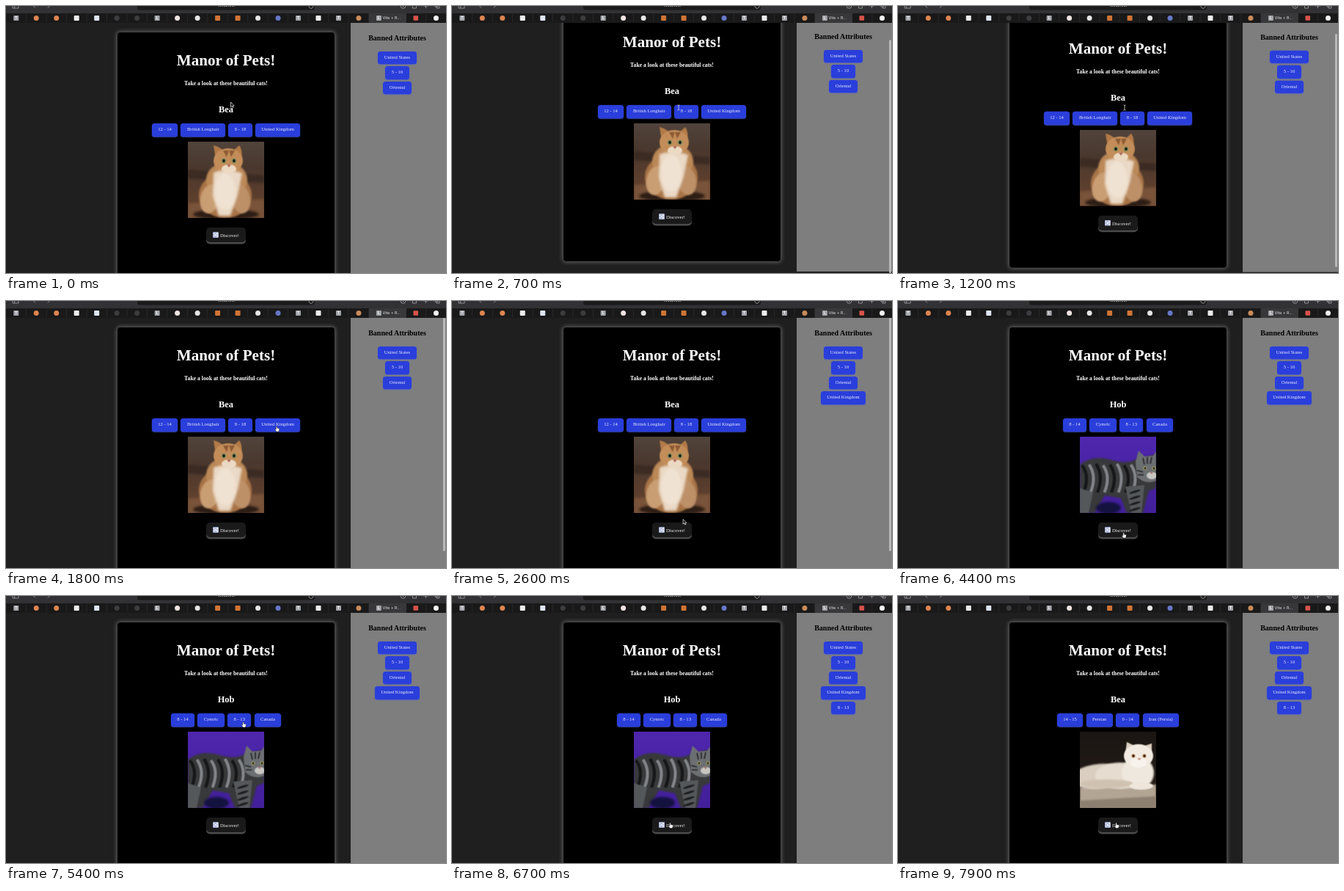
Recreate the animation shown at these times as an HTML page with a canvas. Size 600x364 px, loop 8000 ms.

```html
<!DOCTYPE html>
<html lang="en">
<head>
<meta charset="utf-8">
<title>Manor of Pets!</title>
<style>
html, body { margin: 0; width: 100%; height: 100%; overflow: hidden; background: #1f1f1f; }
#stage { position: relative; width: 600px; height: 364px; overflow: hidden; background: #1f1f1f;
  font: 6.6px 'Liberation Serif', 'Times New Roman', serif; color: #fff; }
#stage div, #stage canvas, #stage svg { position: absolute; }
#page, #side { top: 0; left: 0; width: 600px; height: 400px; }
#card { left: 152px; top: 36px; width: 296px; height: 337px; border-radius: 4px; background: #000;
  box-shadow: 0 0 5px 2px #555; }
#panel { left: 469.5px; top: 20px; width: 130.5px; height: 344px; background: #7e7e7e; }
.line { left: 152px; width: 296px; height: 24px; line-height: 24px; text-align: center;
  font-weight: bold; white-space: nowrap; }
#stage .tag { position: static; box-sizing: border-box; height: 17.3px; line-height: 16.8px; padding: 0 8.5px;
  border-radius: 3.5px; background: #2a3edb; color: #e9ebfb; white-space: nowrap;
  box-shadow: 0 .8px 1.2px #4556d6; }
#tags { left: 152px; top: 160.4px; width: 296px; display: flex; justify-content: center; gap: 4.1px; }
#bans { left: 469.5px; top: 62px; width: 128px; display: flex; flex-direction: column;
  align-items: center; gap: 3.2px; }
#discover { left: 273.3px; top: 302px; width: 53.4px; height: 20px; border-radius: 5px;
  background: #1a1a1a; box-shadow: 0 2.4px 0 #4b4b4b; }
#discover span { position: absolute; left: 18.6px; top: 0; line-height: 21.4px; color: #f2f2f2; }
#discover svg { left: 8.6px; top: 6px; }
#photo { left: 248px; top: 185px; width: 104px; height: 104px; }
#bar { left: 596px; top: 23px; width: 3px; height: 318px; border-radius: 2px; background: #b9b9b9; }
#chrome { left: 0; top: 0; }
.chrome { font-family: 'Inter', 'Liberation Sans', sans-serif; white-space: nowrap; }
#cursor { left: 0; top: 0; overflow: visible; }
</style>
</head>
<body>
<div id="stage">
  <div id="page">
    <div id="card"></div>
    <div class="line" style="top:62.3px;font-size:21.1px">Manor of Pets!</div>
    <div class="line" style="top:93.7px;font-size:7.72px">Take a look at these beautiful cats!</div>
    <div class="line" id="name" style="top:129.2px;font-size:12.4px"></div>
    <div id="tags"></div>
    <canvas id="photo" width="208" height="208"></canvas>
    <div id="discover">
      <svg width="8" height="8" viewBox="0 0 8 8">
        <rect width="8" height="8" rx="1.2" fill="#a9b4d6"/>
        <path d="M1 2.4H2.4L5 5.6H6.8M1 5.6H2.4L5 2.4H6.8M5.8 1.3L7 2.4 5.8 3.5M5.8 4.5L7 5.6 5.8 6.7"
          fill="none" stroke="#fff" stroke-width=".9"/>
      </svg>
      <span>Discover!</span>
    </div>
  </div>
  <div id="side">
    <div id="panel"></div>
    <div class="line" style="left:469.5px;width:128px;top:32.3px;font-size:10px;color:#000">Banned Attributes</div>
    <div id="bans"></div>
  </div>
  <div id="bar"></div>
  <canvas id="chrome" width="600" height="23"></canvas>
  <div class="chrome" style="left:289px;top:-4.6px;font-size:5.4px;line-height:8px;color:#ddd">localhost</div>
  <div class="chrome" style="left:513.5px;top:12.2px;font-size:5.4px;line-height:8px;color:#e4e4e4">Vite + R...</div>
  <svg id="cursor" width="1" height="1">
    <path id="arrow" d="M0 0V6.6L1.6 5.2 2.7 7.5 3.7 7 2.7 4.8H4.7Z" fill="#000" stroke="#fff" stroke-width=".7"/>
    <path id="beam" d="M-1.5 -3.5Q0 -3.5 0 -2.6Q0 -3.5 1.5 -3.5M0 -2.6V2.6M-1.5 3.5Q0 3.5 0 2.6Q0 3.5 1.5 3.5"
      fill="none" stroke="#ddd" stroke-width=".8"/>
    <path id="hand" d="M-.7 .5Q0 -.5 .7 .5V2.6L3 3.1Q4 3.4 3.8 4.6L3.1 7.6H-.2L-2.4 4.7Q-2.3 3.6 -.7 4.7Z"
      fill="#fff" stroke="#111" stroke-width=".5"/>
  </svg>
</div>
<script>
const $ = id => document.getElementById(id);
const LOOP = 8000;

// Browser bar
function drawChrome() {
  const c = $('chrome').getContext('2d');
  const box = (color, x, y, w, h, r = 0) => {
    c.fillStyle = color;
    c.beginPath();
    c.roundRect(x, y, w, h, r);
    c.fill();
  };
  const stroke = (d, x) => {
    c.save();
    c.translate(x, 0);
    c.strokeStyle = '#a5a5a7';
    c.lineWidth = .8;
    c.stroke(new Path2D(d));
    c.restore();
  };
  box('#323234', 0, 0, 600, 10);
  box('#1b1b1c', 179, -6, 242, 11.5, 3);
  box('#19191a', 0, 10, 600, 13);
  box('#38383a', 495, 10, 51, 13);
  c.fillStyle = '#303032';
  for (let i = 1; i < 19; i++) c.fillRect(i * 27.45, 11, .6, 11);
  c.fillRect(572.5, 11, .6, 11);

  stroke('M-4 -3H4V3H-4ZM-1.3 -3V3', 13);
  stroke('M1 -3L-1.5 0L1 2.5', 39);
  stroke('M-1 -3L1.5 0L-1 2.5', 58);
  stroke('M-2 -2A3 3 0 1 0 2 -2', 416);
  stroke('M-3.3 0A3.3 3.3 0 0 0 3.3 0M0 -2V1.5', 541.5);
  stroke('M-2.5 -2V3H2.5V-2', 557);
  stroke('M0 -3V3M-3 0H3', 572.5);
  stroke('M-3 -3H1V1H-3ZM1 -1H3V3H-1V1', 588);

  const icons = ['T', '#dd8550', '#dd8550', '#eee', '#dfe6f5', '#3d3d3f', '#3d3d3f', 'L', '#f0e4e2',
    '#e6e6e6', '#d07434', '#d07434', '#e6e6e6', '#6678c8', 'T', '#eee', 'T', '#c98b5a', 'L'];
  const round = [1, 2, 5, 6, 8, 9, 12, 13, 17];
  c.font = "bold 5px 'Inter', 'Liberation Sans', sans-serif";
  c.textAlign = 'center';
  icons.forEach((icon, i) => {
    const x = 13.8 + i * 27.48, letter = icon.length === 1;
    box(letter ? '#a2a4a8' : icon, x - 3.5, 13, 7, 7, round.includes(i) ? 3.5 : 1);
    if (letter) {
      c.fillStyle = '#fff';
      c.fillText(icon, x, 18.3);
    }
  });
  box('#d9534a', 555.5, 13.2, 6.6, 6.6, 1);
  box('#f2f2f2', 583, 13, 7, 7, 3.5);
}

// Photographs, reduced to soft shapes on a 104 x 104 field
const pic = $('photo').getContext('2d');
function blob(color, x, y, rx, ry, turn = 0) {
  pic.fillStyle = color;
  pic.beginPath();
  pic.ellipse(x, y, rx, ry, turn, 0, 7);
  pic.fill();
}
function shape(color, d) {
  pic.fillStyle = color;
  pic.fill(new Path2D(d));
}
function backdrop(...colors) {
  const g = pic.createLinearGradient(0, 0, 0, 104);
  colors.forEach((c, i) => g.addColorStop(i / (colors.length - 1), c));
  pic.fillStyle = g;
  pic.fillRect(0, 0, 104, 104);
}
const soft = px => pic.filter = `blur(${px}px)`;
function eyes(color, x, y, gap, r) {
  for (const dx of [0, gap]) {
    blob(color, x + dx, y, r, r);
    blob('#15110d', x + dx, y, r * .55, r * .7);
  }
}

function longhair() {
  backdrop('#51443c', '#4a382e', '#593d2d', '#6a4630');
  soft(3);
  shape('#3b2b23', 'M0 38L104 46V56L0 50Z');
  shape('#79533a', 'M0 84L104 78V104H0Z');
  blob('#2c1d15', 52, 99, 45, 7);
  soft(2);
  blob('#a87447', 51, 73, 36, 31);
  blob('#bb8857', 53, 52, 28, 24);
  blob('#c99e73', 30, 78, 13, 20, .2);
  blob('#bd9068', 72, 78, 13, 20, -.2);
  soft(1);
  shape('#b37a48', 'M38 24L35 5Q44 7 50 14ZM60 14L70 5Q75 12 73 24Z');
  blob('#c38d59', 55, 26, 20, 17);
  shape('#8c5a34', 'M48 12L53 21 56 11 59 21 64 12Z');
  soft(3);
  shape('#ead9c6', 'M35 42Q54 35 74 43L68 72 58 101H42L34 74Z');
  blob('#f0e2d2', 51, 68, 14, 25);
  soft(1);
  blob('#ecd9c3', 56, 37, 10, 6);
  shape('#a66151', 'M53 31H59L56 35Z');
  eyes('#7e9a65', 49, 26, 14, 3.3);
}

function cymric() {
  backdrop('#4f27ae', '#4822a4', '#42209a');
  soft(2);
  shape('#38393b', 'M0 38Q18 24 44 32Q66 38 78 30L104 24V70L94 74 86 104H64L56 84 34 80 20 104H0Z');
  soft(1);
  pic.lineWidth = 4;
  for (let i = 0; i < 8; i++) {
    const x = 3 + i * 9.5;
    pic.strokeStyle = i % 2 ? '#83868a' : '#151618';
    pic.stroke(new Path2D(`M${x} ${39 - i % 3}Q${x + 11} 54 ${x + 2} 76`));
  }
  shape('#55585b', 'M0 70L18 76 12 104H0ZM62 68L88 66 84 104H70Z');
  for (let i = 0; i < 4; i++) blob('#1c1d1f', 75, 75 + i * 8, 8, 1.6, -.3);
  shape('#6c6f72', 'M76 34L80 19 88 27 100 26 104 20V60Q90 66 78 55Z');
  pic.lineWidth = 1.6;
  pic.strokeStyle = '#202123';
  pic.stroke(new Path2D('M86 29L88 38M92 28V37M98 28L96 37M78 46L86 48M79 52L87 52'));
  blob('#c7c6c3', 98, 53, 7, 5);
  eyes('#b7b86d', 89, 43, 12, 2.4);
  shape('#9a6a62', 'M95 48H100L98 51Z');
  soft(3);
  blob('#14123f', 39, 97, 17, 8);
}

function persian() {
  backdrop('#1b1613', '#211a16', '#2c231d');
  soft(2);
  shape('#b3a594', 'M0 76L104 72V104H0Z');
  shape('#8e8070', 'M0 94L104 88V104H0Z');
  blob('#d9cebf', 26, 61, 38, 17, -.1);
  blob('#e6ddd0', 55, 60, 34, 18);
  blob('#efe8de', 79, 56, 22, 22);
  blob('#cfc2b1', 37, 71, 36, 6);
  soft(1);
  shape('#ddd0c0', 'M62 30L64 14 76 20ZM86 20L98 16 98 32Z');
  blob('#f1ebe2', 80, 33, 20, 16);
  blob('#f7f3ec', 80, 42, 11, 7);
  shape('#c18f80', 'M78 36H84L81 39Z');
  eyes('#b9702f', 73, 33, 15, 2.4);
  blob('#eee6db', 84, 74, 16, 5);
}

const cats = [
  { from: 0, name: 'Bea', tags: ['12 - 14', 'British Longhair', '8 - 18', 'United Kingdom'], draw: longhair },
  { from: 3900, name: 'Hob', tags: ['8 - 14', 'Cymric', '8 - 13', 'Canada'], draw: cymric },
  { from: 7100, name: 'Bea', tags: ['14 - 15', 'Persian', '9 - 14', 'Iran (Persia)'], draw: persian }
];
const bans = [[0, 'United States'], [0, '5 - 10'], [0, 'Oriental'], [2200, 'United Kingdom'], [5600, '8 - 13']];

function fill(el, labels) {
  el.replaceChildren(...labels.map(label => {
    const tag = document.createElement('div');
    tag.className = 'tag';
    tag.textContent = label;
    return tag;
  }));
}

let shownCat, shownBans;
function showCat(cat) {
  if (cat === shownCat) return;
  shownCat = cat;
  $('name').textContent = cat.name;
  fill($('tags'), cat.tags);
  pic.setTransform(2, 0, 0, 2, 0, 0);
  pic.filter = 'none';
  cat.draw();
}
function showBans(list) {
  if (list.length === shownBans) return;
  shownBans = list.length;
  fill($('bans'), list.map(b => b[1]));
}

function ramp(t, a, b) {
  if (t <= a) return 0;
  if (t >= b) return 1;
  const u = (t - a) / (b - a);
  return u * u * (3 - 2 * u);
}

// Pointer stops: time, x, y
const path = [[0, 306.5, 131], [200, 309, 138.5], [1200, 309, 138.5], [1700, 369, 170.5], [2250, 369, 170.5],
  [2700, 307.5, 315.5], [4600, 307.5, 315.5], [4800, 309, 325], [5300, 323.5, 171.5], [5700, 323.5, 171.5],
  [6200, 297.5, 309], [LOOP, 297.5, 309]];

function pointer(t) {
  const i = path.findIndex(p => p[0] > t);
  const [t0, x0, y0] = path[i - 1], [t1, x1, y1] = path[i];
  const u = ramp(t, t0, t1);
  return [x0 + (x1 - x0) * u, y0 + (y1 - y0) * u];
}
function pointerKind(t, x, y) {
  if (t >= 200 && t < 1300) return 'beam';
  const onTags = x > 198 && x < 402 && y > 160 && y < 178;
  const onDiscover = x > 273 && x < 327 && y > 302 && y < 325;
  return onTags || onDiscover ? 'hand' : 'arrow';
}

function render(t) {
  const s = ramp(t, 100, 600) - ramp(t, 1000, 1500);
  $('page').style.transform = `translateY(${-25 * s}px)`;
  $('side').style.transform = `translateY(${-2 * s}px)`;
  $('bar').style.transform = `translateY(${23 * s}px)`;
  $('bar').style.opacity = ramp(t, 80, 200) - ramp(t, 2850, 3100);
  showCat(cats.findLast(c => c.from <= t));
  showBans(bans.filter(b => b[0] <= t));
  const [x, y] = pointer(t), kind = pointerKind(t, x, y);
  $('cursor').style.transform = `translate(${x}px, ${y}px)`;
  for (const id of ['arrow', 'beam', 'hand']) $(id).style.display = id === kind ? '' : 'none';
}

drawChrome();
const start = performance.now();
function tick() {
  render((performance.now() - start) % LOOP);
  requestAnimationFrame(tick);
}
tick();
</script>
</body>
</html>
```
